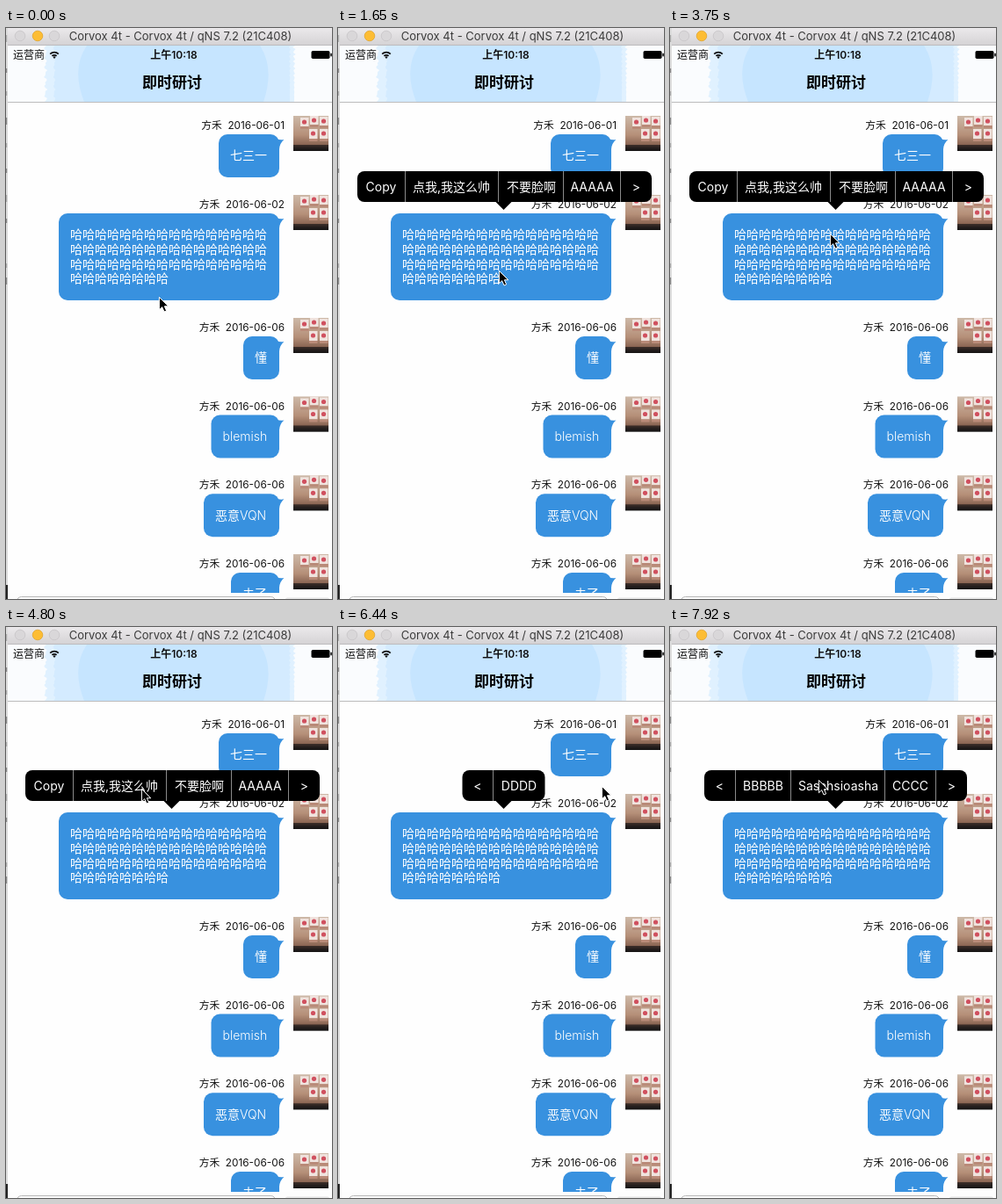
An HTML page for the animation above (8 s loop, 371x650 px).

```html
<!DOCTYPE html>
<html lang="zh">
<head>
<meta charset="utf-8">
<style>
html, body { margin: 0; width: 100%; height: 100%; overflow: hidden; background: #fefefe; }
svg { display: block; font: 14px Inter, "Noto Sans CJK SC", "Noto Sans CJK", sans-serif; }
text { white-space: pre; }
</style>
</head>
<body>
<svg id="stage" width="371" height="650" viewBox="0 0 371 650"></svg>
<script>
const LOOP = 8000;
const BLUE = '#3891df';

const rect = (x, y, w, h, fill, more = '') =>
  `<rect x="${x}" y="${y}" width="${w}" height="${h}" fill="${fill}" ${more}/>`;
const circle = (x, y, r, fill, more = '') =>
  `<circle cx="${x}" cy="${y}" r="${r}" fill="${fill}" ${more}/>`;
const path = (d, fill, more = '') => `<path d="${d}" fill="${fill}" ${more}/>`;
const label = (s, x, y, size, fill, anchor = 'start', weight = 400) =>
  `<text x="${x}" y="${y}" font-size="${size}" fill="${fill}" text-anchor="${anchor}" font-weight="${weight}">${s}</text>`;

const defs = `<defs>
  <linearGradient id="bar" x2="0" y2="1"><stop stop-color="#ebe9eb"/><stop offset="1" stop-color="#d4d2d4"/></linearGradient>
  <linearGradient id="wood" x2="0" y2="1"><stop stop-color="#cdb9a8"/><stop offset=".55" stop-color="#b58f78"/>
    <stop offset=".82" stop-color="#8a6553"/><stop offset=".93" stop-color="#352c2b"/><stop offset="1" stop-color="#151515"/></linearGradient>
  <clipPath id="list"><path d="M2 85H371V643H2Z"/></clipPath>
  <clipPath id="nav"><path d="M2 20H371V84H2Z"/></clipPath>
  <g id="photo">
    ${rect(0, 0, 40, 40, 'url(#wood)')}
    ${[[8, 2], [19, 0], [30, 1], [18, 15], [30, 15]].map(([x, y], i) =>
      rect(x, y, 9.5, i < 3 ? 10 : 11, '#f0e3de') +
      rect(x, y + (i < 3 ? 10 : 11), 9.5, 3, '#b98a78') +
      circle(x + 4.5, y + 5, 2.6, '#d0505f')).join('')}
    ${path('M0 33H40V40H0Z', '#171515', 'opacity=".65"')}
  </g>
</defs>`;

// Torn vertical band across the navigation bar
function band(left, right, rough, fill) {
  const edge = (x, k) => Array.from({ length: 33 }, (_, i) =>
    `${(x + rough * (Math.sin(i * 2.3 + k) + Math.sin(i * 5.1 * k))).toFixed(1)} ${20 + i * 2}`);
  return path('M' + [...edge(left, 1), ...edge(right, 2).reverse()].join('L') + 'Z', fill);
}

const wifi = [3.4, 6.3].map(r =>
  path(`M${55 - r * .76} ${34.5 - r * .76}A${r * 1.07} ${r * 1.07} 0 0 1 ${55 + r * .76} ${34.5 - r * .76}`,
    'none', 'stroke="#111" stroke-width="1.8"')).join('') + path('M53.3 33.1Q55 31.6 56.7 33.1L55 35Z', '#111');

const chrome =
  rect(0, 0, 2, 650, '#dcdcdc') +
  [8, 46, 72, 102, 131, 160, 190, 217, 268, 284].map((y, i) =>
    rect(0, y, 1.2, i % 3 ? 5 : 8, i % 2 ? '#888' : '#aaa')).join('') +
  rect(0, 634, 2, 16, '#222') +
  rect(2, 0, 369, 20, 'url(#bar)') + rect(2, 19, 369, 1, '#bdbbbd') +
  [['#d9d7d9', 16], ['#fdbd34', 36], ['#d9d7d9', 55]].map(([c, x]) =>
    circle(x, 9, 5.8, c, `stroke="${x === 36 ? '#dfa023' : '#c4c2c4'}" stroke-width=".7"`)).join('') +
  label('Corvox 4t - Corvox 4t / qNS 7.2 (21C408)', 198.5, 14, 13, '#3b3b3b', 'middle') +
  `<g clip-path="url(#nav)">` + rect(2, 20, 369, 64, '#fafcfe') +
  band(45, 328, 1.2, '#e0f1ff') + band(55, 323, .8, '#d4ebff') +
  path('M92 20Q74 46 89 84H293Q306 46 289 20Z', '#c6e5ff') + '</g>' +
  rect(2, 84, 369, 1, '#bcbcbc') +
  label('运营商', 8, 34.5, 12, '#111') + wifi +
  label('上午10:18', 191, 34.5, 12, '#111', 'middle', 600) +
  rect(347.5, 26, 21, 9, '#000', 'rx="1.8"') + rect(369.3, 28.8, 1.5, 3.5, '#000') +
  label('即时研讨', 189, 68.3, 17, '#000', 'middle', 700);

// [photo top, bubble left, bubble height, date, lines]
const ha = '哈'.repeat(16);
const messages = [
  [100, 242, 49, '01', ['七三一']],
  [190, 60, 99, '02', [ha, ha, ha, '哈'.repeat(8)]],
  [330, 270, 49, '06', ['懂']],
  [419.5, 233.5, 49, '06', ['blemish']],
  [509.3, 225, 49, '06', ['恶意VQN']],
  [599, 256, 49, '06', ['去了']],
];

const message = ([top, left, height, day, lines]) => {
  const y = top + 21;
  return `<use href="#photo" x="327" y="${top}"/>` +
    label(`方禾  2016-06-${day}`, 317, top + 15, 11.8, '#111', 'end') +
    rect(left, y, 311 - left, height, BLUE, 'rx="10"') +
    path(`M306 ${y + 5}Q312 ${y + 7} 316.5 ${y + 6}Q311.5 ${y + 10} 311 ${y + 17}H306Z`, BLUE) +
    lines.map((s, i) => label(s, left + 13, y + 29.3 + i * 16.6, 14, '#fff', 'start', 300)).join('');
};

const footer = rect(2, 643, 369, 7, '#fdfdfd') +
  rect(12.5, 647.5, 294, 20, '#fff', 'rx="5" stroke="#b5b5b5"') +
  rect(318, 648.5, 50, 10, '#e4e4e4', 'rx="2"');

// [left, right, separators, [text, centre] ...]
const pages = [
  [22, 357, [76, 182, 256, 321],
    ['Copy', 49], ['点我,我这么帅', 129], ['不要脸啊', 220], ['AAAAA', 289], ['&gt;', 339.5]],
  [39, 338, [74, 137, 244, 302],
    ['&lt;', 56.5], ['BBBBB', 106], ['Sasahsioasha', 191.5], ['CCCC', 273.5], ['&gt;', 320.5]],
  [141.5, 235.5, [176], ['&lt;', 159], ['DDDD', 206]],
];

const menu = ([left, right, seps, ...items]) =>
  `<g class="menu">` + rect(left, 163, right - left, 35, '#000', 'rx="8"') +
  path('M179 197.5H198L188.5 207Z', '#000') +
  seps.map(x => rect(x, 163, 1, 35, '#8a8a8a')).join('') +
  items.map(([s, x]) => label(s, x, 186, 14, '#fff', 'middle')).join('') + '</g>';

const stage = document.getElementById('stage');
stage.innerHTML = defs + rect(0, 0, 371, 650, '#fefefe') + chrome +
  `<g clip-path="url(#list)">${messages.map(message).join('')}</g>` + footer +
  pages.map(menu).join('') +
  path('M.4 .4V14.8L3.7 11.7 6 17 8.6 15.9 6.4 10.8H10.8Z', '#000',
    'id="cursor" stroke="#fff" stroke-width="1"');

// [start time, page], -1 hides the menu
const pageTrack = [[0, -1], [1050, 0], [2100, -1], [3750, 0], [5690, 1], [6290, 2], [7320, 1]];

// [start time, x, y]
const cursorTrack = [
  [0, 174, 306], [150, 183, 279], [1500, 183, 277], [1650, 183, 276],
  [2400, 183, 252], [2550, 182, 234],
  [4350, 174, 214], [4500, 157, 194], [4650, 147, 187], [4800, 154, 184],
  [4950, 190, 183], [5090, 252, 182], [5240, 312, 180], [5390, 330, 179],
  [5990, 324, 179], [6140, 319, 179], [6440, 300, 181], [6590, 258, 182],
  [6730, 214, 180], [6880, 185, 177], [7030, 170, 175], [7180, 166, 174], [7920, 169, 174],
];

const at = (track, t) => track.filter(([start]) => start <= t).pop();
const menus = [...document.querySelectorAll('.menu')];
const cursor = document.getElementById('cursor');

function draw() {
  const t = performance.now() % LOOP;
  const [, page] = at(pageTrack, t);
  const [, x, y] = at(cursorTrack, t);
  menus.forEach((m, i) => { m.style.display = i === page ? '' : 'none'; });
  cursor.setAttribute('transform', `translate(${x} ${y})`);
  requestAnimationFrame(draw);
}
draw();
</script>
</body>
</html>
```
